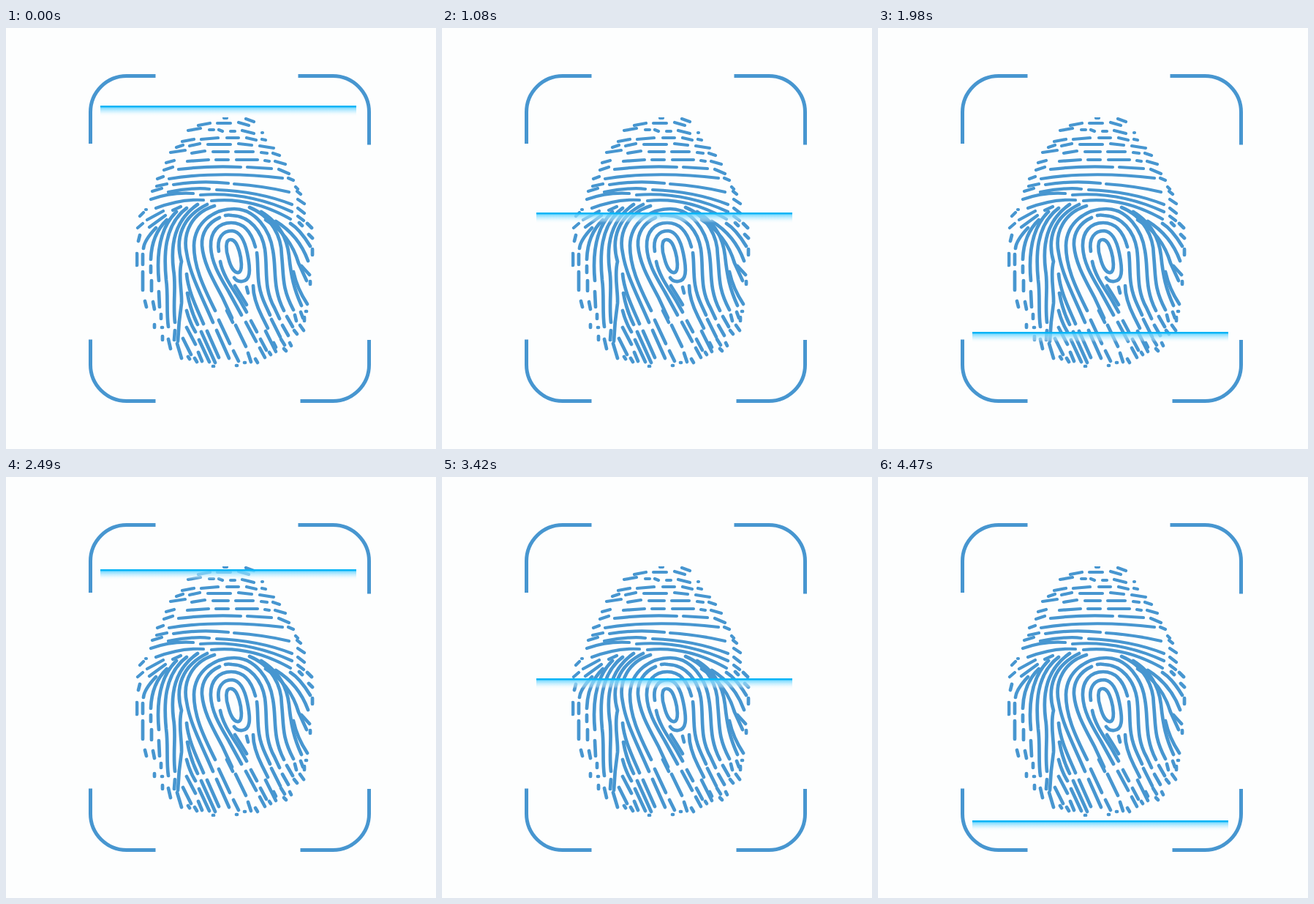
Recreate the animation shown at these times as an HTML page without scripts. Size 588 by 575 pixels, loop 4500 ms.

```html
<!DOCTYPE html>
<html lang="en">
<head>
<meta charset="utf-8">
<title>Fingerprint scan</title>
<style>
  html, body { margin: 0; width: 100%; height: 100%; overflow: hidden; background: #fdfefe; }
  svg { position: absolute; left: 0; top: 0; fill: none; stroke: #4796d0; }
  .frame { stroke-width: 5; }
  .ridges { stroke-width: 4.7; stroke-linecap: round; stroke-linejoin: round; }
  .tip { stroke-width: 4.2; }
  .beam {
    position: absolute; left: 129px; top: 106px; width: 350px; height: 14px;
    background: linear-gradient(#08b4f6 0 2px, #6ad6ffd9 3px, #a5e5ffa6 7px, #dff6ff66 11px, #fdfefe00);
    animation: scan 4.5s -4ms infinite;
  }
  /* One step per 30 ms tick; two downward sweeps per loop. */
  @keyframes scan {
    0%       { top: 106px; animation-timing-function: steps(36); }
    24%      { top: 252px; animation-timing-function: steps(6); }
    28%      { top: 278px; animation-timing-function: steps(6); }
    32%      { top: 309px; animation-timing-function: steps(6); }
    36%      { top: 343px; animation-timing-function: steps(21); }
    50%      { top: 469px; animation-timing-function: step-end; }
    50.6667% { top: 108px; animation-timing-function: steps(5); }
    54%      { top: 120px; animation-timing-function: steps(5); }
    57.3333% { top: 136px; animation-timing-function: steps(4); }
    60%      { top: 153px; animation-timing-function: steps(18); }
    72%      { top: 243px; animation-timing-function: steps(18); }
    84%      { top: 339px; animation-timing-function: steps(18); }
    96%      { top: 441px; animation-timing-function: steps(5); }
    99.3333%, 100% { top: 469px; animation-timing-function: step-end; }
  }
</style>
</head>
<body>
<svg width="588" height="575" viewBox="0 0 588 575">
  <clipPath id="pad"><path d="M177 122H422V464H177Z"/></clipPath>

  <g class="frame">
    <path d="M204.500 65.500H165A49.500 49.500 0 0 0 115.500 115V158"/>
    <path d="M399.500 65.500H447A49.500 49.500 0 0 1 496.500 115V159.500"/>
    <path d="M115.500 425.500V460A49.500 49.500 0 0 0 165 509.500H204.500"/>
    <path d="M402.500 509.500H447A49.500 49.500 0 0 0 496.500 460V426"/>
  </g>

  <g class="ridges" clip-path="url(#pad)">
    <!-- fingertip -->
    <g class="tip">
      <path d="M298 123h4M328 124l11 4M263 133l16-3M289 130h18M318 129l14 4
        M249 140l17-3M278 139h6M291 139l5 2M307 141h6M323 140l16 4M350 143h1
        M241 155l16-3M267 152l23-2M302 150h16M329 150l13 3M350 152l5 1
        M233 163l9-3M251 161l14-3M276 159h31M318 158l18 2M347 161l19 3
        M225 170l20-3M254 171l18-3M283 169h21M314 169h24M349 170l8 1M365 171l9 3"/>
      <path d="M219 184l11-3M248 182l29-2M287 180h17M315 180h29M354 181l6 1M368 182l14 4
        M216 194l12-4M236 193Q278 188 321 190M330 190l33 2M373 193l14 6
        M207 206l8-3M223 206C270 198 330 199 378 205M386 205l7 3
        M206 216l14-3M229 214Q265 208 304 212M312 213Q354 216 387 224M396 217l3 3"/>
      <path d="M200 223l13-4M222 224Q260 217 278 220M288 221Q345 223 391 241M398 223l5 4
        M198 234Q226 224 256 226M266 228Q330 223 391 251M399 234l9 6
        M205 246Q240 233 270 235M281 236Q335 230 389 261M399 246l9 7"/>
      <path d="M191 248h1M183 257l5-5M193 262l22-12M180 273l7-6M196 272l22-16M228 249l11-5M399 257l8 6"/>
    </g>

    <!-- core -->
    <path d="M307 289C299 289 301 305 304 314C307 326 312 335 318 334C324 332 322 315 319 305C316 295 313 289 307 289Z"/>
    <path d="M291 305C288 287 296 277 309 277C321 278 327 293 330 308C335 332 334 345 323 346Q316 347 312 341"/>
    <path d="M293 319C297 340 312 358 320 372L329 388M335 400l8 15M348 425l8 15"/>
    <path d="M341 299C336 280 326 266 308 266C291 266 279 278 280 299C281 322 294 342 305 361L322 392M328 402l14 26"/>
    <path d="M300 256Q304 255 309 256C334 257 350 278 354 302C358 330 352 355 367 382L374 397"/>
    <path d="M292 259C276 266 267 280 268 297C270 322 284 345 296 368L309 396M314 406l14 29"/>
    <path d="M286 386C268 350 257 325 257 297C258 265 285 247 312 247C341 247 361 276 365 304C370 330 364 355 380 386"/>
    <path d="M343 307C346 330 341 350 355 379L361 392M329 354l2 8M338 352Q338 370 350 394L358 410M313 352Q322 366 329 378"/>

    <!-- left flank -->
    <path d="M285 243C255 252 241 279 247 307C251 333 263 357 275 384L283 402"/>
    <path d="M275 241C240 258 231 288 240 319C235 338 241 360 240 376Q236 402 235 428"/>
    <path d="M262 241C230 263 225 296 229 330C233 352 228 375 231 402M231 413l-1 13"/>
    <path d="M247 246C215 270 216 313 219 344C222 365 219 388 222 408M222 425l3 13"/>
    <path d="M233 251C209 274 206 312 209 345M209 360l1 21M212 391v6M213 409h1M214 421v5"/>
    <path d="M220 262Q199 282 198 316M198 325v9M199 345v14M201 374l2 10M203 405v4"/>
    <path d="M205 273Q189 290 188 301M187 309v14M187 333v25M190 373l2 8M179 308v16M181 291l2-8"/>

    <!-- right flank -->
    <path d="M333 245C363 257 377 285 377 311C380 340 377 355 393 385"/>
    <path d="M349 251C372 265 384 284 387 311C390 340 394 357 404 379"/>
    <path d="M355 262C383 279 394 301 400 321L411 345M393 333Q398 356 412 377"/>
    <path d="M369 264C392 278 405 296 413 318M389 267Q402 275 416 298M401 266l4 4M412 267l6 6M414 282l5 5M419 302v8M404 325l11 12M416 346v4"/>

    <!-- base -->
    <path d="M247 336C249 360 262 385 270 404M275 414l16 36M248 362Q252 385 262 405M267 415l19 42M247 386Q251 402 259 415M264 426l14 30
      M247 409l12 23M242 424l11 22M263 443l5 12M234 431l6 20M249 449l2 3M258 451l3 5M283 462h1"/>
    <path d="M291 399l15 32M311 441l7 14M288 413l17 38M302 386l8 16M315 461h1M331 444l4 12M326 457h1
      M347 437l7 13M341 452l3 5M360 443l2 3M363 398l12 24M355 414l14 28M380 438l3 3M376 425l5 8
      M378 406l8 14M384 394l8 14M366 430l3 6M395 392l2 8M403 388l3 8M408 395v5M394 413l4 5M402 406l5 7M388 430l2 4M410 387h1"/>
  </g>
</svg>
<div class="beam"></div>
</body>
</html>
```
